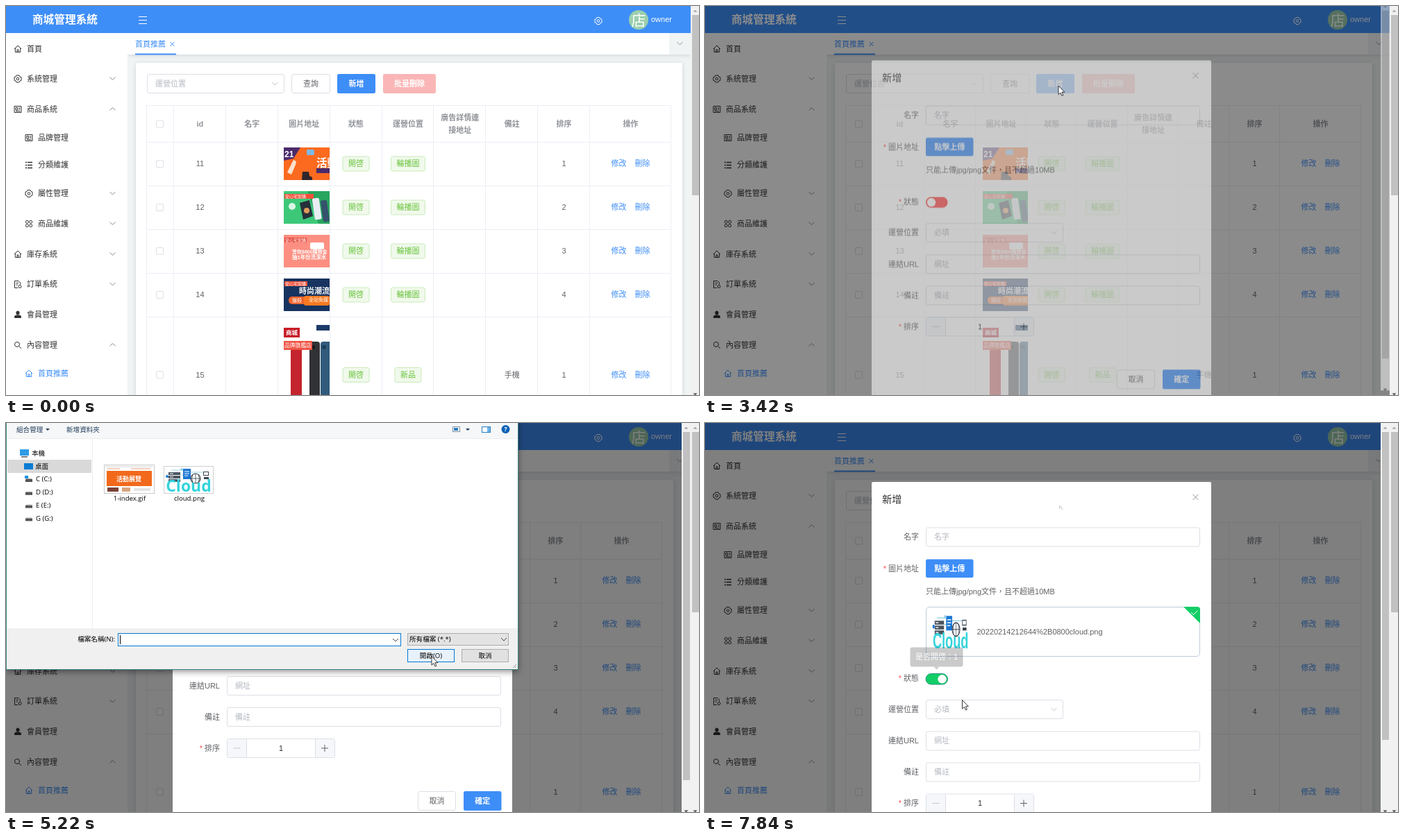
Write an HTML page that moves like this. It is 998x561 px and loops after 8 s.

```html
<!DOCTYPE html>
<html lang="zh-Hant">
<head>
<meta charset="utf-8">
<title>商城管理系統</title>
<style>
  html, body { margin: 0; width: 100%; height: 100%; overflow: hidden; background: #fff; }
  svg { display: block; }
  #stage { width: 100vw; height: 100vh; font-family: "Liberation Sans", "Noto Sans CJK TC", "Noto Sans CJK", sans-serif; }
  .native { font-family: "Open Sans", "Noto Sans CJK TC", "Noto Sans CJK", sans-serif; }
  .soft { filter: drop-shadow(0 1px 3px rgba(0, 21, 41, .14)); }
  .raised { filter: drop-shadow(0 3px 4px rgba(0, 0, 0, .4)); }
</style>
</head>
<body>
<svg id="stage" viewBox="0 0 998 561"></svg>
<script>
const BLUE = '#3e8ef7', GREEN = '#13ce66', LINE = '#dcdfe6', HINT = '#b4b8c0', NAVY = '#1e395b';

// Drawing helpers; text is placed by its vertical centre.
const text = (x, y, s, { size = 11, fill = '#606266', anchor = 'start', weight = 400, id = '' } = {}) =>
  `<text ${id && `id="${id}"`} x="${x}" y="${y + size * .36}" font-size="${size}" fill="${fill}" text-anchor="${anchor}" font-weight="${weight}">${s}</text>`;
const mid = (x, y, s, o = {}) => text(x, y, s, { anchor: 'middle', ...o });
const box = (x, y, w, h, fill, more = '') => `<rect x="${x}" y="${y}" width="${w}" height="${h}" fill="${fill}" ${more}/>`;
const frame = (x, y, w, h, fill = '#fff', stroke = LINE, r = 2.5) =>
  box(x + .5, y + .5, w - 1, h - 1, fill, `stroke="${stroke}" rx="${r}"`);
const line = (d, stroke = '#909399', width = 1) => `<path d="${d}" fill="none" stroke="${stroke}" stroke-width="${width}"/>`;
const shape = (d, fill) => `<path d="${d}" fill="${fill}"/>`;
const disc = (x, y, r, fill, more = '') => `<circle cx="${x}" cy="${y}" r="${r}" fill="${fill}" ${more}/>`;
const chevron = (x, y, up = false, color = '#8b8f96') =>
  line(`M${x - 4} ${y + (up ? 2 : -2)}l4 ${up ? -4 : 4} 4 ${up ? 4 : -4}`, color);
const triangle = (x, y, r, up, fill) => shape(`M${x - r} ${y + (up ? r / 2 : -r / 2)}h${2 * r}l${-r} ${up ? -r : r}z`, fill);
const button = (x, y, w, h, label, fill, color = '#fff', id = '') =>
  box(x, y, w, h, fill, `rx="2.5" ${id && `id="${id}"`}`) + mid(x + w / 2, y + h / 2, label, { fill: color, weight: 700 });
const plainButton = (x, y, w, h, label) => frame(x, y, w, h) + mid(x + w / 2, y + h / 2, label, { weight: 500 });

const icons = {
  home: 'M-5 0L0-5 5 0M-3.7-1V4.5H3.7V-1M-1 4.5V1H1V4.5',
  gear: 'M-2-5H2L3-3 5-2.3V2.3L3 3 2 5H-2L-3 3-5 2.3V-2.3L-3-3zM-1.8 0a1.8 1.8 0 1 0 3.6 0a1.8 1.8 0 1 0-3.6 0',
  card: 'M-5-4.5H5V4.5H-5zM-3-2.5H-.5V1H-3zM1-2H3.5M1 0H3.5M-3 2.7H3.5',
  list: 'M-5-4H-3M-5 0H-3M-5 4H-3M-2-4H5M-2 0H5M-2 4H5',
  grid: [-2.7, 2.7].flatMap(x => [-2.7, 2.7].map(y => `M${x - 2} ${y}a2 2 0 1 0 4 0a2 2 0 1 0-4 0`)).join(''),
  doc: 'M0 5H-4.5V-5H1L3.5-2.5V0M-2.5-2H1M-2.5 .5H0M1 3a2 2 0 1 0 4 0a2 2 0 1 0-4 0',
  user: 'M-2.2-2.5a2.2 2.5 0 1 0 4.4 0a2.2 2.5 0 1 0-4.4 0M-4.5 4.5V2.5Q-4 1-1.5 1H1.5Q4 1 4.5 2.5V4.5z',
  search: 'M-4.5-1a3.5 3.5 0 1 0 7 0a3.5 3.5 0 1 0-7 0M1.7 1.7L5 5',
};
const icon = (name, x, y, color = '#303133') =>
  `<path transform="translate(${x} ${y})" d="${icons[name]}" fill="${name === 'user' ? color : 'none'}" stroke="${color}" stroke-width="${name === 'list' ? 1.6 : 1}"/>`;

function sidebar() {
  // label, centre, icon, nested, arrow
  const items = [
    ['首頁', 62, 'home'], ['系統管理', 105, 'gear', 0, 'down'], ['商品系統', 149, 'card', 0, 'up'],
    ['品牌管理', 190, 'card', 1], ['分類維護', 229.5, 'list', 1], ['屬性管理', 270.5, 'gear', 1, 'down'],
    ['商品維護', 314, 'grid', 1, 'down'], ['庫存系統', 358, 'home', 0, 'down'], ['訂單系統', 401.5, 'doc', 0, 'down'],
    ['會員管理', 445, 'user'], ['內容管理', 489, 'search', 0, 'up'], ['首頁推薦', 530, 'home', 1],
  ];
  return box(0, 39, 175, 522, '#fff') + box(0, 510, 175, 39, '#ecf4fe', 'id="menuHover"') +
    items.map(([label, y, name, nested, arrow], i) => {
      const color = i === items.length - 1 ? BLUE : '#303133';
      return icon(name, nested ? 33 : 17, y, color) + text(nested ? 46 : 30, y, label, { fill: color }) +
        (arrow ? chevron(153.5, y - .5, arrow === 'up') : '');
    }).join('');
}

const art = [
  box(0, 0, 66, 47, '#fb6a1f') + shape('M0 0H24L14 16 0 19z', '#4a2a6b') + text(1, 10, '21', { size: 12, fill: '#fff', weight: 700 }) +
    box(33, 3, 11, 8, '#7db9e8', 'rx="2"') + shape('M5 36L12 22l2-4 4 2-1 5-6 14z', '#fde3cf') + shape('M27 35h9l1 6 4 2v4H26z', '#30262c') +
    text(47, 22, '活動', { size: 15.5, fill: '#fff', weight: 700 }) + box(47, 30, 19, 7, '#4a2a6b'),
  box(0, 0, 66, 47, '#3cc878') + shape('M34 0H66V47H50z', '#28a55f') + box(1, 4, 42, 7, '#f1513b') +
    text(2, 7.5, '安心宅家購', { size: 6, fill: '#fff' }) + disc(12, 22, 5, '#d9f6e5') + shape('M23 17l14-4 5 23-14 5z', '#26303a') +
    disc(33, 28, 4, '#e09b5a') + box(43, 10, 10, 31, '#e8eef3', 'rx="2" transform="rotate(-8 48 27)"') + box(55, 13, 9, 31, '#35516c', 'rx="2" transform="rotate(-8 60 29)"'),
  box(0, 0, 66, 47, '#fc8f81') + box(1, 4, 32, 7, '#e85043') + text(2, 7.5, '安心宅家購', { size: 6, fill: '#fff' }) +
    box(38, 11, 20, 10, '#fff', 'rx="2"') + text(12, 24, '等你$600購物金', { size: 7, fill: '#fff', weight: 700 }) +
    text(12, 32, '抽1年份洗潔水', { size: 7.5, fill: '#fff', weight: 700 }),
  box(0, 0, 66, 47, '#17335f') + box(1, 4, 33, 7, '#f1513b') + text(2, 7.5, '安心宅家購', { size: 6, fill: '#fff' }) +
    text(22, 18, '時尚潮流日', { size: 11, fill: '#fff', weight: 700 }) + box(7, 26, 26, 11, '#f0642d', 'rx="5"') +
    box(29, 25, 37, 14, '#fa7a22', 'rx="3"') + text(12, 31, '爆殺', { size: 7, fill: '#fff' }) + text(36, 30, '全站免運', { size: 7, fill: '#fff' }),
  box(0, 0, 66, 110, '#fff') + box(47, 4, 19, 8, '#1c3a68') + box(10, 33, 16, 77, '#c3242d', 'rx="4"') +
    box(37, 28, 15, 82, '#303236', 'rx="4"') + box(53, 28, 16, 82, '#315a7c', 'rx="4"') +
    disc(42, 36, 3, '#17191c') + disc(58, 36, 3, '#1d3d58') + box(0, 8, 23, 14, '#c81d28') +
    text(3, 15, '商城', { size: 8.5, fill: '#fff', weight: 700 }) + box(0, 27, 41, 13, '#f05343') + text(1, 33.5, '品牌旗艦店', { size: 7.8, fill: '#fff' }),
];

const rowTops = [196, 259, 322, 385, 448, 616];

function table(right) {
  const narrow = right < 950, start = narrow ? 244 : 242, end = right - 117, width = (end - start) / 8;
  const center = i => start + width * (i + .5);
  const heads = ['id', '名字', '圖片地址', '狀態', '運營位置', '', '備註', '排序'];
  const head = { fill: '#909399', weight: 700 };
  const tag = (x, y, w, s) => frame(x - w / 2, y - 11, w, 22, '#f0f9eb', '#cbebbc') + mid(x, y, s, { fill: '#67c23a' });
  const check = y => frame(216, y - 5.5, 11, 11, '#fff', LINE, 1.5);
  const tops = rowTops.slice(0, 5);
  let out = box(187, 82, right - 171, 490, '#fff', 'rx="3" class="soft"') +
    frame(203, 98, 198, 28) + text(215, 112, '運營位置', { fill: HINT }) + chevron(387, 112, false, '#c0c4cc') +
    plainButton(411, 98, 56, 28, '查詢') + button(477, 98, 55, 28, '新增', narrow ? '#65a5f9' : BLUE, '#fff', narrow ? '' : 'addButton') +
    button(543, 98, 76, 28, '批量刪除', '#fab6b6');
  if (!narrow) out += tops.map((y, i) => box(203, y, 755, rowTops[i + 1] - y, '#f2f7fe', `id="row${i}"`)).join('');
  const edges = [203, ...Array.from({ length: 9 }, (_, i) => start + width * i), right];
  out += line(edges.map(x => `M${Math.round(x) - .5} 143V561`).join('') +
    [143, ...tops].map(y => `M203 ${y + .5}H${right}`).join(''), '#ebeef5');
  out += check(170) + heads.map((s, i) => mid(center(i), 170, s, head)).join('') +
    mid(center(5), 161, '廣告詳情連', head) + mid(center(5), 179, '接地址', head) + mid((end + right) / 2, 170, '操作', head);
  tops.forEach((top, i) => {
    const y = (top + rowTops[i + 1]) / 2, link = (end + right) / 2;
    out += check(y) + mid(center(0), y, 11 + i) +
      `<svg x="400" y="${top + 8}" width="${narrow ? 65 : 66}" height="${i < 4 ? 47 : 110}">${art[i]}</svg>` +
      tag(center(3), y, 39, '開啓') + tag(center(4), y, i < 4 ? 50 : 39, i < 4 ? '輪播圖' : '新品') +
      mid(center(6), y, i < 4 ? '' : '手機') + mid(center(7), y, i % 4 + 1) +
      mid(link - 17, y, '修改', { fill: BLUE }) + mid(link + 17, y, '刪除', { fill: BLUE });
  });
  return out;
}

const scrollbar = (x, thumb, id = '') => box(x, 0, 13, 561, '#f1f1f1') +
  box(x + 2, 13, 10, thumb, '#c1c1c1', id && `id="${id}"`) +
  triangle(x + 6.5, 7, 3, true, '#a3a3a3') + triangle(x + 6.5, 560, 3, false, '#505050');

const header = box(0, 0, 986, 39, BLUE) + mid(85, 19.5, '商城管理系統', { size: 15.7, fill: '#fff', weight: 700 }) +
  line('M191 15.5H203M191 20.5H203M191 25.5H203', '#fff') + icon('gear', 853, 21.5, '#fff') +
  disc(911, 20, 14, '#9bcfae') + mid(911, 20, '店', { size: 21, fill: '#fff' }) + text(929, 19.5, 'owner', { fill: '#fff' });

const tabs = box(175, 39, 811, 31, '#fff', 'class="soft"') + text(186, 55, '首頁推薦', { fill: BLUE }) +
  line('M236.5 52l6 6m0-6l-6 6', BLUE) + box(186, 68.5, 59, 2, BLUE) + box(955, 39, 31, 31, '#f1f4f5') + chevron(970.5, 54);

// Sample picture, 70 by 38.
const cloudPicture = box(0, 0, 70, 38, '#fff') + line('M10 5H26M38 8H56M23 12H27', '#9fd8ea') +
  [8, 13, 18].map(y => box(6, y, 17, 4, '#4a5560') + box(8, y + 1.5, 5, 1, '#fff')).join('') +
  box(27, 3, 11, 15, '#1c78d4') + line('M29 7H36M29 10H36M29 13H34', '#fff') +
  disc(45, 17, 7, '#fff', 'stroke="#37424d" stroke-width="1.2"') + line('M38 17H52M45 10V24M41 12q-3 5 0 10M49 12q3 5 0 10', '#37424d', .8) +
  frame(56, 7, 8, 6, '#fff', '#37424d', 0) + box(57, 15, 7, 3, '#37424d') + disc(25, 4, 2, '#9dd3ef') + disc(4, 14, 2, '#1c78d4') +
  mid(35, 28, 'Cloud', { size: 23, fill: '#35d3dc', weight: 700 });

function modal() {
  const label = (y, s, required) =>
    text(308, y, (required ? '<tspan fill="#ff4949">* </tspan>' : '') + s, { anchor: 'end' });
  const input = (y, s, w = 395) => frame(318, y - 14, w, 28) + text(330, y, s, { fill: HINT });
  return box(240, 85, 489, 500, '#fff', 'rx="2"') + text(255, 109.5, '新增', { size: 14.2, fill: '#303133' }) +
    line('M702.5 103l8 8m0-8l-8 8') + text(509.5, 121, 'h,', { size: 8, fill: '#a9adb3', id: 'residue' }) +
    label(164.5, '名字') + input(164.5, '名字') +
    label(210, '圖片地址', true) + button(318, 196.5, 68.5, 26.5, '點擊上傳', BLUE, '#fff', 'uploadButton') +
    text(318, 243, '只能上傳jpg/png文件，且不超過10MB') +
    `<g id="uploaded">${frame(318, 265, 395, 72, '#fff', '#c0ccda', 4.5)}
      <g transform="translate(326 274) scale(.79 1.4)">${cloudPicture}</g>
      ${shape('M689 265H709Q713 265 713 269V289z', GREEN)}${line('M700 273l3.5 3.5 6-6', '#fff')}
      ${text(391.5, 301, '20220214212644%2B0800cloud.png')}</g>
    <g id="lower">${label(289, '狀態', true)}
      ${box(318, 282, 31.5, 15.5, '#ff4949', 'rx="7.75" id="switchTrack"')}${disc(326, 289.8, 6.2, '#fff', 'id="knob"')}
      ${label(333.5, '運營位置')}${input(333.5, '必填', 198)}${chevron(502.5, 333.5, false, '#c0c4cc')}
      ${label(379, '連結URL')}${input(379, '網址')}${label(424, '備註')}${input(424, '備註')}
      ${label(469, '排序', true)}${frame(318, 455, 156, 28)}
      ${box(319, 456, 27, 26, '#f5f7fa')}${box(446, 456, 27, 26, '#f5f7fa')}${line('M346.5 456v26M445.5 456v26', LINE)}
      ${line('M327.5 469h10', '#c0c4cc')}${line('M454 469h10M459 464v10', '#606266')}${mid(396, 469, '1', { weight: 500, fill: '#303133' })}
      ${plainButton(593, 531, 55, 28, '取消')}${button(659, 531, 54.5, 28, '確定', BLUE)}</g>
    <g id="tooltip">${box(295.5, 323.5, 76, 28, '#303133', 'rx="3"')}${triangle(333.5, 353.5, 4, false, '#303133')}
      ${mid(333.5, 337.5, '', { fill: '#fff', id: 'tooltipText' })}</g>` + scrollbar(973, 502, 'thumb');
}

function picker() {
  const t = (x, y, s, o = {}) => text(x, y, s, { size: 9.6, fill: '#000', ...o });
  const small = (x, y, w, h, fill, stroke) => frame(x, y, w, h, fill, stroke, 0);
  const drives = ['C', 'D', 'E', 'G'].map((d, i) => {
    const y = 81 + i * 18.8;
    return box(28, y, 10, 4, '#555') + line(`M29 ${y - .5}h8`, '#aaa') + (i ? '' : box(27, y - 5, 5, 4, '#1d8fe0')) + t(43, y, `${d} (${d}:)`);
  }).join('');
  return box(.5, -78, 737, 433.5, '#fff', 'stroke="#3a8280" class="raised"') + box(1, 0, 736, 22, '#f6f7f8') + line('M1 22.5H737M124.5 23V296', '#ededed') +
    t(15, 9.5, '組合管理', { fill: NAVY }) + triangle(60, 9.5, 3, false, NAVY) + t(87, 9.5, '新增資料夾', { fill: NAVY }) +
    small(643, 5, 11, 8, '#fff', '#7d8fa3') + box(645, 7, 6, 4, '#2b7ec1') + triangle(665, 9.5, 3, false, NAVY) +
    small(685, 5, 13, 9, '#fff', '#2b7ec1') + box(693, 6, 4, 7, '#70b2e4') +
    disc(719.5, 9, 6, '#0b62b5') + mid(719.5, 9, '?', { size: 9.5, fill: '#fff', weight: 700 }) +
    box(2, 53, 121, 19, '#d9d9d9') + box(20, 38, 13, 9, '#2e9be6') + box(22, 48, 9, 1.5, '#555') + t(37, 43.5, '本機') +
    box(26, 58, 13, 9, '#0b7cd4') + t(42, 62.5, '桌面') + drives +
    small(141, 60, 73, 42, '#fff', '#c9c9c9') + line('M143 63H211', '#d0d0d0') + line('M146 66H164M180 66H208', '#e59b70') + box(145, 69, 65, 22, '#f2691c') +
    mid(177, 81, '活動展覽', { size: 9, fill: '#fff', weight: 700 }) + box(146, 93, 16, 6, '#7c4236') + box(167, 93, 12, 6, '#d8a47c') + box(184, 94, 24, 4, '#e4e4e4') +
    t(178, 109, '1-index.gif', { anchor: 'middle' }) +
    box(222, 55, 84, 62, '#d9ebf9', 'id="fileHover"') + small(227, 62, 72, 40, '#fff', '#d0d0d0') +
    `<g transform="translate(228 63)">${cloudPicture}</g>` + t(264, 109, 'cloud.png', { anchor: 'middle' }) +
    box(1, 296, 736, 59, '#f0f0f0') + t(157, 312, '檔案名稱(N):', { anchor: 'end' }) + small(161, 303, 408, 19, '#fff', '#0078d7') +
    t(165, 312, '', { id: 'fileName' }) + line('M164.5 306v13', '#000') + chevron(561, 313, false, '#444') +
    small(578, 303, 146, 18, '#e3e3e3', '#adadad') + t(581, 312, '所有檔案 (*.*)') + chevron(717, 312, false, '#444') +
    small(578, 326, 68, 19, '#e8f2fb', '#0078d7') + t(612, 336, '開啟(O)', { anchor: 'middle' }) +
    small(656, 326, 68, 19, '#e1e1e1', '#adadad') + t(690, 336, '取消', { anchor: 'middle' }) +
    line('M730 353l5-5M733 353l2-2', '#999');
}

document.getElementById('stage').innerHTML = box(0, 0, 998, 561, '#f1f4f5') +
  `<g id="wide">${table(958)}</g><g id="narrow">${table(945)}</g>` + tabs + sidebar() + header + scrollbar(986, 260) +
  box(0, 0, 986, 561, '#000', 'id="shade"') + `<g id="modal">${modal()}</g><g id="picker" class="native">${picker()}</g>
  <g id="cursor">${disc(11, -1, 4, '#cfe8ff', 'stroke="#2186dc" stroke-width="2" id="busy"')}
  <path d="M.5 .5V13.2L3.4 10.5 5.4 15 7.4 14.1 5.4 9.7H9.3z" fill="#fff" stroke="#222" stroke-width=".9"/></g>`;

const el = Object.fromEntries([...document.querySelectorAll('[id]')].map(n => [n.id, n]));
const set = (id, name, value) => el[id].setAttribute(name, value);
const show = (id, opacity) => set(id, 'opacity', +opacity);

// Keys are [time, ...values]; each holds until the next one, like a screen captured five times a second.
const at = (keys, t) => keys.filter(k => k[0] <= t).pop().slice(1);
const pointer = [
  [0, -50, -50], [400, 181, 550], [600, 95, 546], [800, 68, 544],
  [1600, 85, 540], [1800, 155, 512], [2000, 303.5, 330.5], [2200, 430, 185], [2400, 498, 124], [2620, 508.5, 114.5],
  [3820, 500, 122], [4020, 462, 150], [4220, 410, 185], [4420, 368, 207], [4620, 349, 214],
  [5220, 612.5, 336], [5420, 510, 262], [5620, 350, 145], [5820, 270, 92], [6020, 259, 87],
  [6420, 264, 100], [6620, 285, 165], [6820, 311, 250], [7020, 327, 325], [7220, 334, 360], [7420, 336, 369], [7840, 370, 399],
];
const opening = [[0, 0], [3420, .67], [3620, 1]];
const pickerFade = [[0, 0, 1], [5020, .92, .99], [5220, 1, 1], [6220, .06, .954], [6420, 0, 1]];
const uploadFade = [[0, 0], [6620, .4], [6820, .9], [7020, 1]];
const tooltipFade = [[0, 0], [7420, .8], [7640, 1], [7840, .25]];
// Start and strength of the glow left on each row the pointer sweeps over.
const rowGlow = [[2200, .5], [2200, .5], [2200, .5], [2000, .5], [2000, 1]];

function render(t) {
  const within = (from, to) => t >= from && t < to;
  const [x, y] = at(pointer, t), [open] = at(opening, t);
  set('cursor', 'transform', `translate(${x} ${y})`);
  show('busy', within(4820, 5220));
  show('menuHover', within(600, 2200));
  rowGlow.forEach(([from, strength], i) => show('row' + i, within(from, from + 200) * strength));
  set('addButton', 'fill', t >= 3020 ? '#3880de' : t >= 2400 ? '#65a5f9' : BLUE);

  show('wide', !open);
  show('narrow', open > 0);
  show('shade', Math.min(.5, open * .68));
  show('modal', open ** 1.5);
  set('modal', 'transform', `translate(0 ${-20 * (1 - open)})`);
  show('residue', t >= 3820);
  set('uploadButton', 'fill', within(4420, 7640) ? '#65a5f9' : BLUE);

  const [alpha, scale] = at(pickerFade, t);
  show('picker', alpha);
  set('picker', 'transform', `translate(369 139) scale(${scale}) translate(-369 -139)`);
  show('fileHover', within(5820, 6420));
  el.fileName.textContent = t >= 6020 ? 'cloud.png' : '';

  const [uploaded] = at(uploadFade, t), on = t >= 7640;
  show('uploaded', uploaded);
  set('lower', 'transform', `translate(0 ${uploaded ? 79.5 : 0})`);
  set('thumb', 'height', uploaded ? 444 : 502);
  set('switchTrack', 'fill', on ? GREEN : '#ff4949');
  set('switchTrack', 'stroke', on ? '#2a8f86' : 'none');
  set('knob', 'cx', on ? 341.5 : 326);
  show('tooltip', at(tooltipFade, t)[0]);
  el.tooltipText.textContent = '是否開啓：' + (on ? 1 : 0);
}

const begin = performance.now();
(function tick() {
  render((performance.now() - begin) % 8000);
  requestAnimationFrame(tick);
})();
</script>
</body>
</html>
```
